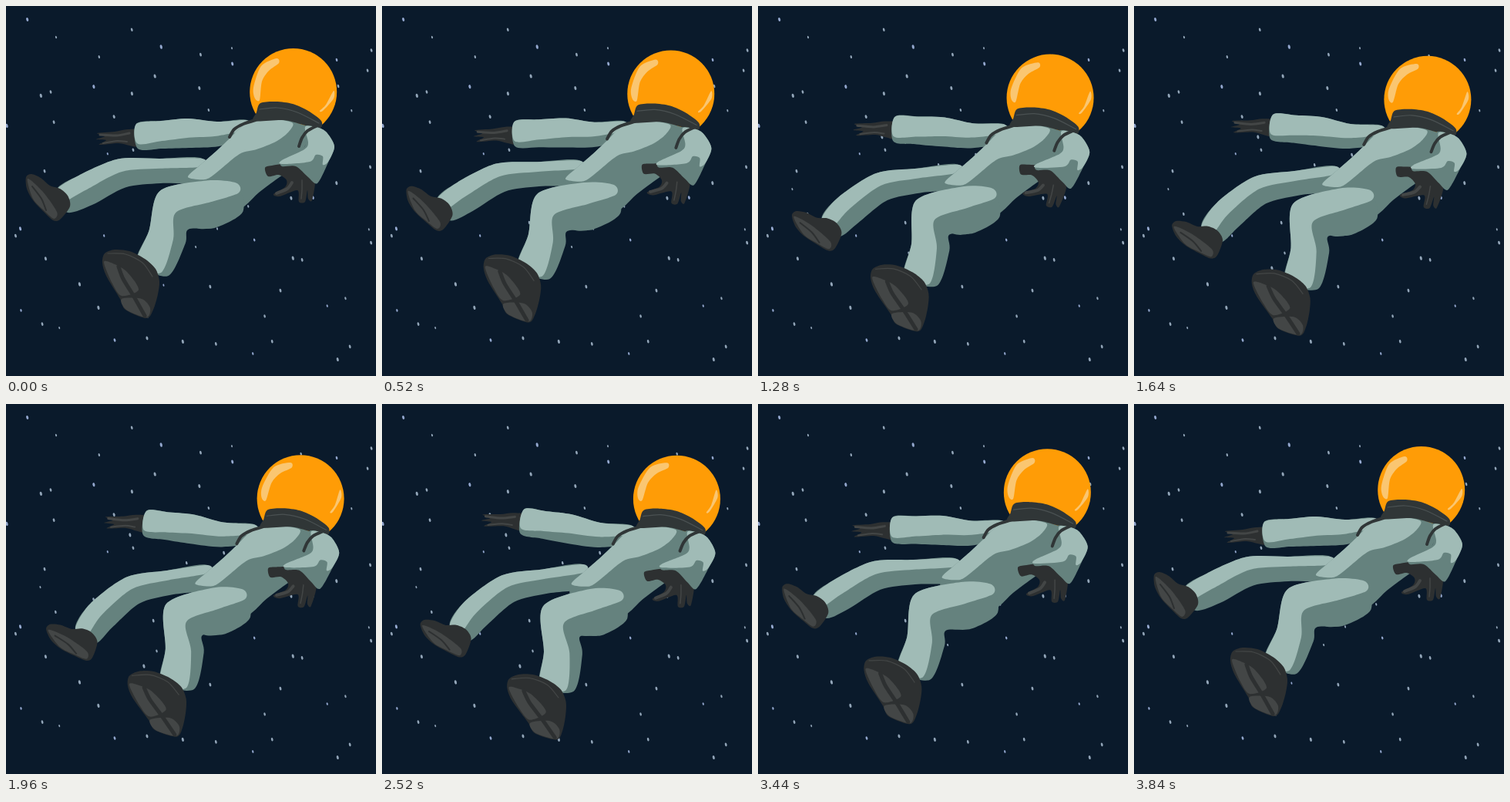
Animation of 480x480 px, one loop 3880 ms. Source, as an HTML page with a canvas:

```html
<!DOCTYPE html>
<html>
<head>
<meta charset="utf-8">
<title>Floating astronaut</title>
<style>
html, body { margin: 0; width: 100%; height: 100%; overflow: hidden; background: #0a1a2b; }
canvas { display: block; }
</style>
</head>
<body>
<canvas id="stage" width="480" height="480"></canvas>
<script>
const ctx = document.getElementById('stage').getContext('2d');
const LOOP = 3880, STEP = 40, END = LOOP - STEP;
const LIGHT = '#a0bbb6', SHADE = '#65827e', DARK = '#2d3031', GREY = '#434646', COLLAR = '#303637';

// Drift out to 1 at the peak time, then back to 0: brisk start, soft turn.
function swing(t, peak) {
  const u = t < peak ? t / peak : (END - t) / (END - peak);
  return u * (0.6 + u * (1.8 - 1.4 * u));
}

const pairs = list => list.flatMap((x, i) => i % 2 ? [] : [[x, list[i + 1]]]);
const random = n => Math.abs(Math.sin(n * 12.9898 + 4) * 43758.5453) % 1;

// Smooth curve through the points.
function trace(pts, closed) {
  const n = pts.length;
  const at = i => closed ? pts[(i + n) % n] : pts[Math.min(Math.max(i, 0), n - 1)];
  ctx.beginPath();
  ctx.moveTo(...pts[0]);
  for (let i = 0; i < (closed ? n : n - 1); i++) {
    const [a, b, c, d] = [at(i - 1), at(i), at(i + 1), at(i + 2)];
    ctx.bezierCurveTo(b[0] + (c[0] - a[0]) / 7, b[1] + (c[1] - a[1]) / 7,
      c[0] - (d[0] - b[0]) / 7, c[1] - (d[1] - b[1]) / 7, c[0], c[1]);
  }
}

function blob(color, ...list) {
  trace(pairs(list), true);
  ctx.fillStyle = color;
  ctx.fill();
}

function line(color, width, ...list) {
  trace(pairs(list), false);
  ctx.strokeStyle = color;
  ctx.lineWidth = width;
  ctx.stroke();
}

// Draw in rest coordinates, shifted and turned about a pivot.
function rigid([x, y], dx, dy, turn, paint) {
  ctx.save();
  ctx.translate(x + dx, y + dy);
  ctx.rotate(turn);
  ctx.translate(-x, -y);
  paint();
  ctx.restore();
}

// Sleeve along joints [x, y, radius, dx, dy]; its lit side ends between lit0 and lit1 radii.
function sleeve(joints, k, lit0, lit1) {
  const last = joints.length - 1;
  const mid = joints.map(([x, y, r, dx, dy]) => [x + dx * k, y + dy * k, r]);
  const side = factor => mid.map(([x, y, r], i) => {
    const a = mid[Math.max(i - 1, 0)], b = mid[Math.min(i + 1, last)];
    const tx = b[0] - a[0], ty = b[1] - a[1];
    const offset = r * factor(i / last) / Math.hypot(tx, ty);
    return [x + ty * offset, y - tx * offset];
  });
  const band = (color, edge) =>
    blob(color, ...[...side(() => 1), ...side(edge).reverse()].flat());
  band(SHADE, () => -1);
  band(LIGHT, u => lit0 + (lit1 - lit0) * u);
}

function drawSky() {
  ctx.fillStyle = '#0a1a2b';
  ctx.fillRect(0, 0, 480, 480);
  for (let i = 0; i < 80; i++) {
    const x = (i % 10 + random(i)) * 48, y = 14 + (Math.floor(i / 10) + random(i + 100)) * 56;
    const size = 0.7 + 0.5 * random(i + 200);
    ctx.fillStyle = i % 4 ? '#93a6b9' : '#94a8cf';
    ctx.beginPath();
    ctx.ellipse(x, y, 1.3 * size, 2.3 * size, -0.25, 0, 7);
    ctx.fill();
  }
}

function drawFarArm(t) {
  const k = swing(t, 2650);
  rigid([172, 172], 12 * k, -18 * k, 0.07 * k, () => {
    blob(DARK, 118,165, 141,163, 158,160, 178,162, 174,182, 160,181, 146,178, 121,180, 130,174, 117,173, 128,169);
    line(GREY, 3, 122,167, 143,168, 160,165);
    line(GREY, 2, 126,178, 144,175, 157,176);
  });
  sleeve([[170, 169, 16, 12, -17], [202, 167, 18, 9, -10], [237, 165, 19, 6, -3],
    [275, 166, 16, 7, 4], [315, 159, 11, 10, 10]], k, -0.6, 0);
}

function drawFarLeg(t) {
  const k = swing(t, 2150);
  sleeve([[72, 253, 16, 31, 49], [103, 239, 21, 21, 36], [150, 217, 19, 15, 25],
    [200, 214, 16, 12, 18], [255, 213, 15, 9, 11]], k, -0.1, 0.3);
  rigid([74, 252], 34 * k, 53 * k, -0.35 * k, () => {
    blob(DARK, 26,222, 33,218, 45,223, 57,233, 70,237, 80,246, 83,260, 70,277, 61,278, 49,267, 35,252, 27,237);
    blob(GREY, 28,224, 47,240, 66,267, 62,276, 49,265, 35,250);
    line(DARK, 2, 34,234, 46,250, 52,265);
  });
}

function drawBody(t) {
  const k = swing(t, 2350);
  rigid([372.7, 111.5], 10 * k, 12 * k, 0, () => {
    drawHelmet(k);
    blob(SHADE, 322,148, 350,144, 385,154, 398,160, 386,185, 370,210, 352,224, 328,242, 309,260, 270,287, 240,282, 234,222, 250,208, 272,189, 290,172, 305,157);
    blob(LIGHT, 322,148, 350,147, 372,152, 366,164, 350,176, 325,186, 303,192, 272,217, 258,225, 236,222, 250,208, 272,189, 290,172, 305,157);
    blob(COLLAR, 330,126, 350,124, 372,127, 392,136, 409,149, 407,159, 385,154, 360,148, 322,149, 325,138);
    line('#4a5152', 1.2, 329,134, 352,132, 378,138, 406,152);
    line(COLLAR, 4, 327,147, 308,153, 296,160, 290,170);
  });
}

function drawHelmet(k) {
  const [x, y] = [372.7, 111.5];
  ctx.fillStyle = '#ff9c06';
  ctx.beginPath();
  ctx.arc(x, y, 56.5, 0, 7);
  ctx.fill();
  // Both glints climb the glass as the helmet sinks.
  rigid([x, y], 0, 0, 0.2 * k, () =>
    blob('#fac671', 351,68, 354,74, 341,84, 332,98, 329,122, 323,120, 321,106, 331,78));
  rigid([x, y], 0, 0, -0.2 * k, () =>
    blob('#fac671', 425,110, 425,120, 411,136, 407,136, 415,128));
}

function drawNearLeg(t) {
  const k = swing(t, 2600);
  sleeve([[190, 341, 22, 37, 28], [209, 300, 25, 26, 23], [218, 265, 31, 15, 17],
    [266, 257, 31, 12, 13], [303, 248, 19, 10, 12]], k, -0.55, 0.3);
  rigid([190, 340], 38 * k, 30 * k, -0.1 * k, () => {
    blob(DARK, 125,333, 128,321, 141,316, 160,318, 180,328, 194,341, 199,357, 197,374, 191,394, 182,405, 155,394, 148,380, 130,350);
    blob(GREY, 127,332, 141,335, 157,345, 172,368, 150,376, 138,360);
    blob(GREY, 150,380, 176,380, 187,392, 182,404, 156,394);
    line(DARK, 5, 146,338, 152,354, 166,377, 180,402);
    line(GREY, 1.2, 132,321, 155,322, 177,333, 190,351);
  });
}

function drawNearArm(t) {
  const k = swing(t, 2350);
  const curl = Math.sin(Math.PI * Math.min(t / 2450, 1));
  rigid([380, 210], 4 * k, 9 * k, 0.2 * curl, () => {
    blob(DARK, 336,210, 345,207, 375,204, 392,213, 401,226, 397,252, 392,250, 391,239, 388,254, 380,254, 378,239, 355,247, 347,244, 362,235, 364,226, 354,219, 340,221);
    line(GREY, 4, 351,243, 365,237, 371,229);
    line(GREY, 1.5, 384,226, 384,238, 383,250);
  });
  rigid([398, 160], 8 * k, 10 * k, 0.06 * k, () => {
    blob(SHADE, 386,156, 402,157, 415,163, 426,182, 418,203, 404,230, 392,222, 376,208, 358,208, 358,200, 386,184, 388,172);
    blob(LIGHT, 388,157, 402,157, 415,163, 426,182, 418,202, 411,206, 411,195, 402,193, 394,202, 358,205, 358,200, 387,186, 392,177);
    line(COLLAR, 4, 404,155, 391,162, 384,171, 380,182);
  });
}

ctx.lineCap = ctx.lineJoin = 'round';
function frame() {
  const t = Math.min(Math.floor(performance.now() % LOOP / STEP) * STEP, END);
  drawSky();
  for (const draw of [drawFarArm, drawFarLeg, drawBody, drawNearLeg, drawNearArm]) draw(t);
  requestAnimationFrame(frame);
}
frame();
</script>
</body>
</html>
```
